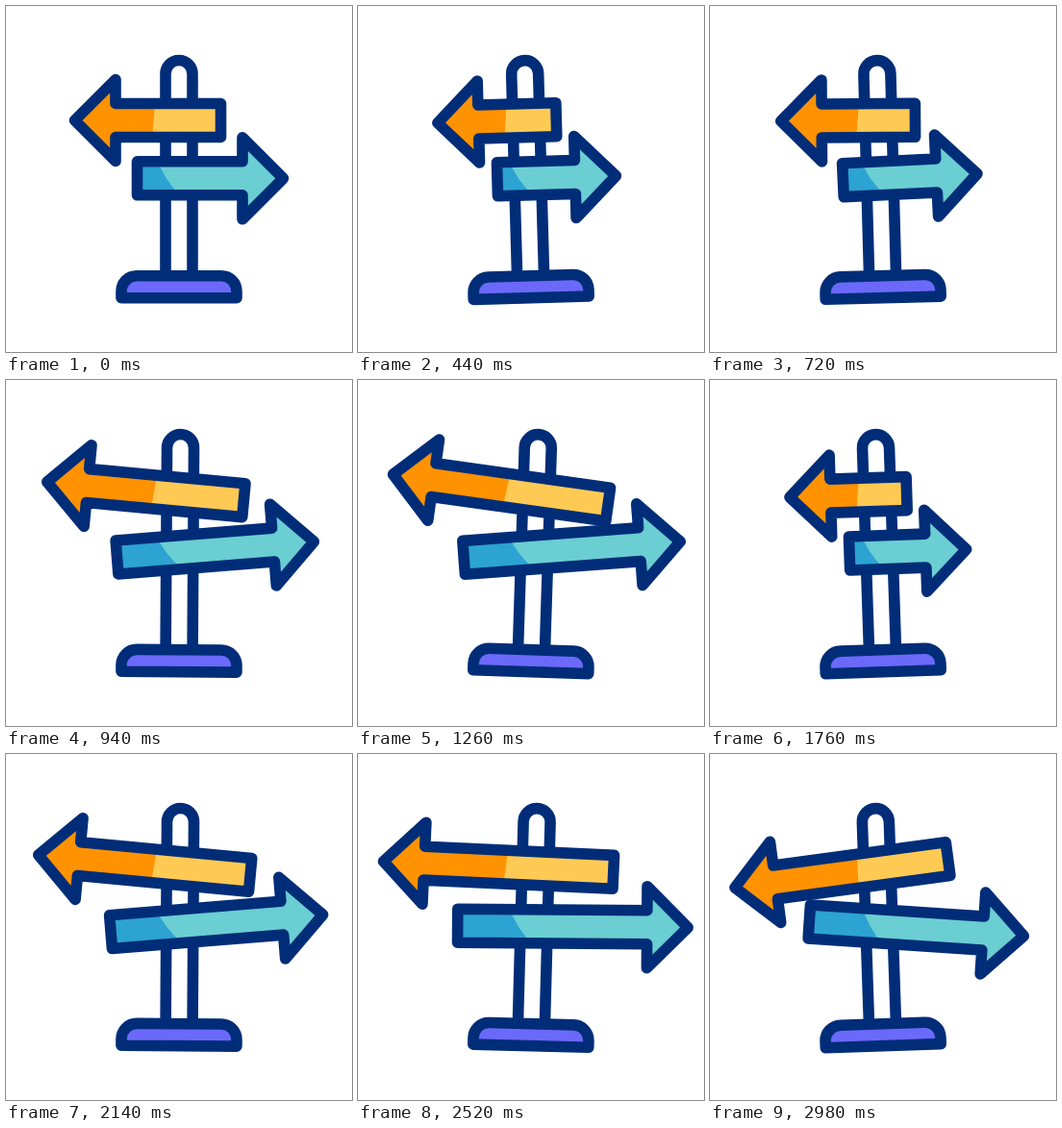
Animation of 360 by 360 pixels, one loop 3 s. Source, as an HTML page:

```html
<!DOCTYPE html>
<html lang="en">
<head>
<meta charset="utf-8">
<title>Signpost</title>
<style>
  html, body { margin: 0; width: 100%; height: 100%; overflow: hidden; background: #fff; }
  svg { display: block; width: 100vw; height: 100vh; }
  .line { fill: none; stroke: #012d78; stroke-width: 11.6; stroke-linejoin: round; stroke-linecap: round; }
</style>
</head>
<body>
<svg viewBox="0 0 360 360">
  <defs>
    <clipPath id="clip-left"><path class="left"/></clipPath>
    <clipPath id="clip-right"><path class="right"/></clipPath>
  </defs>
  <g id="post">
    <path class="line" d="M166 281V70.5a14 14 0 0 1 28 0V281"/>
    <path class="line" style="fill:#6b69fa" d="M120 303.7v-7a16 16 0 0 1 16-16h88a16 16 0 0 1 16 16v7z"/>
  </g>
  <path class="left" fill="#ffca54"/>
  <g clip-path="url(#clip-left)">
    <path id="shade-left" fill="#ff9200" d="M2-60Q1.5-12 0 0T-2 60H-200V-60z"/>
  </g>
  <path class="left line"/>
  <path class="right" fill="#6aced3"/>
  <g clip-path="url(#clip-right)">
    <path id="shade-right" fill="#2ca3d2" d="M-10-20Q-3 0 14 18H-200V-20z"/>
  </g>
  <path class="right line"/>
</svg>
<script>
const LOOP = 3000, STEP = 20;
const BASE = { x: 180, y: 296 };
const RAD = Math.PI / 180;

// Eased track through evenly spaced values
function track(values, spacing, time) {
  const i = Math.min(Math.floor(time / spacing), values.length - 2);
  const u = Math.min(time / spacing - i, 1);
  return values[i] + (values[i + 1] - values[i]) * u * u * (3 - 2 * u);
}

const sway = t => track([0, -1.95, 1.95, -1.95, 1.95, -1.95], 600, t);
const stretch = t => track([1, .7, 1.8, .7, 1.8, 1.8, .7], 570, t);
const swing = t => track([0, 0, 6.9, 0, 5.9, -6.6, 0], 570, t);

const arrows = [
  { name: 'left', dir: -1, y: 119, splitX: 153.6, anchor: 3.5 },
  { name: 'right', dir: 1, y: 179.3, splitX: 167, anchor: 1.5 }
].map(a => ({
  ...a,
  outlines: document.querySelectorAll('.' + a.name),
  shade: document.getElementById('shade-' + a.name)
}));
const post = document.getElementById('post');

// The shaft stretches about its anchor; the head keeps its size
function arrowPath(dir, anchor, scale) {
  const place = x => dir * (anchor + (x - anchor) * scale);
  const back = place(-43.5), head = place(66), tip = head + 42.5 * dir;
  return `M${tip} 0L${head}-42.5V-17.5H${back}V17.5H${head}V42.5z`;
}

function draw(time) {
  const lean = sway(time), scale = stretch(time), turn = swing(time);
  post.setAttribute('transform', `rotate(${lean} ${BASE.x} ${BASE.y})`);
  for (const { dir, y, splitX, anchor, outlines, shade } of arrows) {
    const reach = BASE.y - y, angle = lean - dir * turn;
    const px = BASE.x + reach * Math.sin(lean * RAD);
    const py = BASE.y - reach * Math.cos(lean * RAD);
    const d = arrowPath(dir, anchor, scale);
    for (const path of outlines) {
      path.setAttribute('d', d);
      path.setAttribute('transform', `translate(${px} ${py}) rotate(${angle})`);
    }
    shade.setAttribute('transform', `translate(${splitX} ${y}) rotate(${angle})`);
  }
}

function tick() {
  const time = performance.now() % LOOP;
  draw(Math.floor(time / STEP) * STEP);
  requestAnimationFrame(tick);
}
draw(0);
requestAnimationFrame(tick);
</script>
</body>
</html>
```
